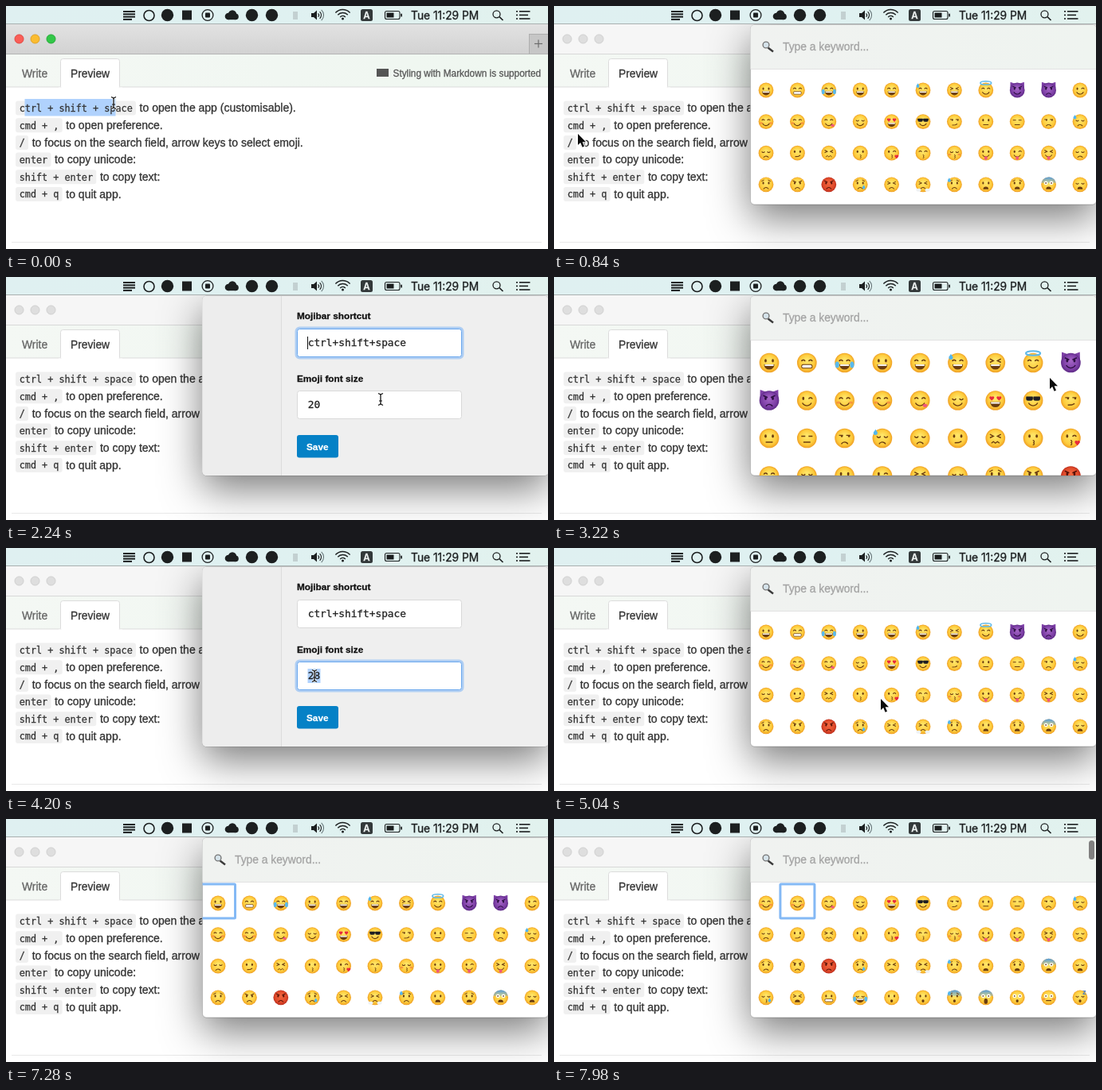
Animation, 680 px wide and 306 px high, one loop 8000 ms. Source, as an HTML page with a canvas:

```html
<!DOCTYPE html>
<html lang="en">
<head>
<meta charset="utf-8">
<title>Emoji menu bar demo</title>
<style>
html, body { margin: 0; width: 680px; height: 306px; overflow: hidden; background: #fff; }
canvas { display: block; width: 680px; height: 306px; }
</style>
</head>
<body>
<canvas id="stage"></canvas>
<script>
const W = 680, H = 306, LOOP = 8000, STEP = 140, TAU = Math.PI * 2;
const canvas = document.getElementById('stage');
const dpr = window.devicePixelRatio || 1;
canvas.width = W * dpr;
canvas.height = H * dpr;
const c = canvas.getContext('2d');

const SANS = '"Liberation Sans", Arial, sans-serif';
const MONO = '"DejaVu Sans Mono", monospace';
const UI = 'Inter, Roboto, sans-serif';

// ---- helpers ----
function rect(x, y, w, h, fill) {
  c.fillStyle = fill;
  c.fillRect(x, y, w, h);
}
function round(x, y, w, h, r, fill, stroke, lw = 1) {
  c.beginPath();
  c.roundRect(x, y, w, h, r);
  if (fill) { c.fillStyle = fill; c.fill(); }
  if (stroke) { c.strokeStyle = stroke; c.lineWidth = lw; c.stroke(); }
}
function disc(x, y, r, fill, stroke, lw = 1) {
  c.beginPath();
  c.arc(x, y, r, 0, TAU);
  if (fill) { c.fillStyle = fill; c.fill(); }
  if (stroke) { c.strokeStyle = stroke; c.lineWidth = lw; c.stroke(); }
}
function oval(x, y, rx, ry, fill) {
  c.beginPath();
  c.ellipse(x, y, rx, ry, 0, 0, TAU);
  c.fillStyle = fill;
  c.fill();
}
function path(points, fill, stroke, lw = 1) {
  c.beginPath();
  points.forEach(p => c.lineTo(p[0], p[1]));
  if (fill) { c.closePath(); c.fillStyle = fill; c.fill(); }
  if (stroke) { c.strokeStyle = stroke; c.lineWidth = lw; c.stroke(); }
}
function bow(x, y, r, from, to, color, lw) {
  c.beginPath();
  c.arc(x, y, r, from * Math.PI, to * Math.PI);
  c.strokeStyle = color;
  c.lineWidth = lw;
  c.stroke();
}
// A hairline outline gives the slightly heavy look of smoothed desktop type.
function text(s, x, y, size, color, font = SANS, weight = '') {
  c.font = `${weight} ${size}px ${font}`;
  c.fillStyle = c.strokeStyle = color;
  c.lineWidth = size * .022;
  c.fillText(s, x, y);
  c.strokeText(s, x, y);
}
function fade(x0, y0, x1, y1, ...colors) {
  const g = c.createLinearGradient(x0, y0, x1, y1);
  colors.forEach((k, i) => g.addColorStop(i / (colors.length - 1), k));
  return g;
}

// ---- menu bar ----
function menuBar() {
  const ink = '#1c1f20';
  rect(0, 0, W, 22, fade(0, 0, W, 0, '#dff0f1', '#dff1f1', '#e2f2ee'));
  rect(0, 22, W, 1, '#a9b0b0');
  for (let i = 0; i < 4; i++) rect(147, 6 + i * 3.3, i === 3 ? 11 : 15, 2, ink);
  disc(179.5, 12, 6.5, null, ink, 1.6);
  disc(202.5, 11.5, 7.7, ink);
  rect(221, 5.5, 12, 12, ink);
  disc(253, 11.5, 6.9, null, ink, 1.3);
  round(250, 8.5, 6, 6, 1, ink);
  disc(279, 13, 4.3, ink);
  disc(284, 10.5, 5.2, ink);
  disc(288, 13.4, 3.8, ink);
  rect(279, 12, 9, 5.2, ink);
  disc(308.5, 11.5, 7.7, ink);
  disc(333.5, 11.5, 7.7, ink);
  rect(360, 7, 6, 10, '#c3d0d1');
  path([[383, 9], [386, 9], [390, 5.5], [390, 17.5], [386, 14], [383, 14]], ink);
  [3, 6, 9].forEach((r, i) => bow(389.5, 11.5, r, -.26, .26, i < 2 ? ink : '#68777a', 1.1));
  [4.5, 8.5, 12.5].forEach(r => bow(422.5, 17, r, -.76, -.24, ink, 1.4));
  disc(422.5, 16, 1.5, ink);
  round(445, 4, 15, 15, 2.5, '#33393a');
  text('A', 448.3, 15.6, 11.5, '#f1f6f5', UI, 600);
  round(475.5, 6.5, 18.5, 10, 2, null, ink, 1.1);
  rect(477.5, 8.5, 9, 6, ink);
  round(495.3, 9.5, 1.7, 4, 1, ink);
  text('Tue 11:29 PM', 508, 16.6, 13.8, ink, UI);
  disc(615.5, 10.3, 4.5, null, ink, 1.3);
  path([[619, 13.7], [623.5, 18]], null, ink, 1.6);
  for (let i = 0; i < 3; i++) {
    rect(640, 6 + i * 4.6, 2, 1.6, ink);
    rect(644, 6 + i * 4.6, i === 1 ? 11 : 13.5, 1.6, ink);
  }
}

// ---- browser window ----
const LINES = [
  ['ctrl + shift + space', 'to open the app (customisable).'],
  ['cmd + ,', 'to open preference.'],
  ['/', 'to focus on the search field, arrow keys to select emoji.'],
  ['enter', 'to copy unicode:'],
  ['shift + enter', 'to copy text:'],
  ['cmd + q', 'to quit app.']
];

function browser(active, selEnd) {
  rect(0, 22, W, H - 22, '#fff');
  rect(0, 23, W, 37, active ? fade(0, 23, 0, 60, '#e2e2e2', '#d2d2d2') : '#f6f6f6');
  rect(0, 60, W, 1, active ? '#b4b4b4' : '#d8d8d8');
  const lights = active
    ? [['#fa5e57', '#e1443e'], ['#fbbc30', '#dfa023'], ['#32c748', '#24aa35']]
    : Array(3).fill(['#dedede', '#cfcfcf']);
  lights.forEach(([f, s], i) => disc(16.5 + i * 20, 41.5, 5.5, f, s));
  if (active) {
    rect(656, 35, 24, 25, '#c6c6c6');
    rect(656, 35, 24, 1, '#aeaeae');
    rect(656, 35, 1, 25, '#aeaeae');
    path([[663, 47.5], [673, 47.5]], null, '#6c6c6c', 1.2);
    path([[668, 42.5], [668, 52.5]], null, '#6c6c6c', 1.2);
  }
  rect(0, 61, W, 41, fade(0, 0, W, 0, '#f4f8f4', '#f1f7f2', '#eff7f0'));
  rect(0, 101.5, W, 1, '#dcdcdc');
  round(68.5, 66.5, 74, 38, 3, '#fff', '#dcdcdc');
  rect(66, 102.5, 80, 4, '#fff');
  text('Write', 20, 89.6, 13.9, '#666');
  text('Preview', 81, 89.6, 13.8, '#333');
  rect(465, 79, 15, 10, '#555');
  text('Styling with Markdown is supported', 485.5, 88.7, 11.85, '#555');

  LINES.forEach(([code, note], i) => {
    const y = 128.5 + i * 21.7, w = code.length * 7.1 + 9;
    round(12, y - 9, w, 18, 3, '#f0f0f0');
    if (!i && selEnd) rect(23.5, 117, selEnd - 23.5, 21.5, '#b0d2fd');
    text(code, 16.7, y + 4.3, 11.8, '#333', MONO);
    text(note, 16.6 + w, y + 4.8, 14, '#333');
  });
  rect(7, 297, 665, 1, '#e9e9e9');
}

// ---- emoji: eyes, mouth, extras ----
const FACES = ('oG uB uGT oG uG uGd xG uSH aSp afp wS ' +
  'uSc uSc uSy nS hG gS l/ o- -- lf nfd ' +
  'nf o/ xw ok wkh uk nkc ot wt xt nf ' +
  'sf af afr sfe xf xfm sfd oD sD ODb nD ' +
  'nke xD oB nGT oo oo sobd OOb Oo O-c noZ').split(' ');

function eyes(kind, ink) {
  for (const s of [-1, 1]) {
    const x = s * .36, y = -.2;
    const k = kind === 'w' ? (s < 0 ? 'o' : 'u') : kind;
    if ('oas'.includes(k)) oval(x, y, .11, .17, ink);
    if (k === 'a') path([[s * .6, -.5], [s * .16, -.3]], null, ink, .12);
    if (k === 's') path([[s * .6, -.42], [s * .26, -.6]], null, ink, .1);
    if (k === 'u') bow(x, -.1, .18, 1.08, 1.92, ink, .12);
    if (k === 'n') bow(x, -.26, .19, .1, .9, ink, .11);
    if (k === '-') path([[x - .2, y], [x + .2, y]], null, ink, .11);
    if (k === 'x') path([[s * .55, -.38], [s * .2, -.2], [s * .55, -.04]], null, ink, .11);
    if (k === 'l') {
      path([[x - .2, -.28], [x + .2, -.28]], null, ink, .1);
      oval(x + .08, -.2, .1, .1, ink);
    }
    if (k === 'O') {
      oval(x, y, .24, .25, '#fff');
      oval(x, y, .09, .1, ink);
    }
    if (k === 'h') heart(x, -.26, .34);
    if (k === 'g') {
      c.beginPath();
      c.roundRect(x - .34, -.4, .68, .42, [.05, .05, .2, .2]);
      c.fillStyle = '#1d1d22';
      c.fill();
    }
  }
}

function mouth(kind, ink) {
  if (kind === 'G') {
    c.beginPath();
    c.arc(0, .16, .52, 0, Math.PI);
    c.closePath();
    c.fillStyle = ink;
    c.fill();
    rect(-.44, .17, .88, .15, '#fff');
  }
  if (kind === 'B') round(-.52, .18, 1.04, .36, .16, '#fff', ink, .08);
  if (kind === 'S') bow(0, .02, .5, .14, .86, ink, .11);
  if (kind === 'f') bow(0, .78, .38, 1.17, 1.83, ink, .11);
  if (kind === '-') path([[-.35, .4], [.35, .4]], null, ink, .11);
  if (kind === '/') path([[-.3, .46], [.1, .44], [.38, .3]], null, ink, .11);
  if (kind === 'w') path([[-.4, .5], [-.2, .34], [0, .5], [.2, .34], [.4, .5]], null, ink, .1);
  if (kind === 'k') {
    bow(0, .34, .11, -.6, .5, ink, .09);
    bow(0, .55, .11, -.5, .6, ink, .09);
  }
  if (kind === 'o') oval(0, .45, .17, .2, ink);
  if (kind === 'O') oval(0, .48, .24, .36, ink);
  if (kind === 'D') {
    c.beginPath();
    c.arc(0, .62, .34, Math.PI, TAU);
    c.closePath();
    c.fillStyle = ink;
    c.fill();
  }
  if (kind === 't' || kind === 'y') {
    bow(0, .02, .48, .14, .86, ink, .11);
    round(-.2, .46, .4, .42, [0, 0, .2, .2], '#f0597a');
  }
}

function heart(x, y, s) {
  const red = '#e8283c';
  disc(x - s * .32, y - s * .1, s * .38, red);
  disc(x + s * .32, y - s * .1, s * .38, red);
  path([[x - s * .68, y + s * .05], [x + s * .68, y + s * .05], [x, y + s * .85]], red);
}
function drop(x, y, s) {
  disc(x, y, s, '#52b6ee');
  path([[x - s * .9, y - s * .3], [x, y - s * 1.9], [x + s * .9, y - s * .3]], '#52b6ee');
}

function extra(kind) {
  if (kind === 'T') for (const s of [-1, 1]) oval(s * .74, .2, .2, .32, '#58b9ef');
  if (kind === 'd') drop(-.68, -.52, .2);
  if (kind === 'e') drop(.46, .42, .19);
  if (kind === 'c') for (const s of [-1, 1]) oval(s * .62, .2, .2, .13, 'rgba(244,98,60,.5)');
  if (kind === 'y') oval(.5, .5, .22, .17, '#f2577c');
  if (kind === 'h') heart(.65, .42, .36);
  if (kind === 'm') for (const s of [-1, 1]) oval(s * .58, .72, .32, .2, '#eef2f6');
  if (kind === 'Z') text('z', .35, -.4, .9, '#4b7fc0', SANS, 'bold');
  if (kind === 'H') {
    c.beginPath();
    c.ellipse(0, -.95, .72, .22, 0, 0, TAU);
    c.strokeStyle = '#5fb9ea';
    c.lineWidth = .17;
    c.stroke();
  }
}

function emoji(spec, x, y, r) {
  const [eye, lip, ...more] = spec;
  const purple = more.includes('p'), red = more.includes('r');
  const tones = purple ? ['#a263c4', '#7d3fa6', '#5d2a85']
    : red ? ['#f0653e', '#e04a2a', '#b92c1c']
    : ['#ffe568', '#fdcb3c', '#ee9c22'];
  c.save();
  c.translate(x, y);
  c.scale(r, r);
  if (purple) for (const s of [-1, 1]) path([[s * .9, -1.08], [s * .92, -.2], [s * .3, -.85]], tones[1]);
  const g = c.createRadialGradient(0, -.25, .1, 0, 0, 1);
  g.addColorStop(0, tones[0]);
  g.addColorStop(.7, tones[1]);
  g.addColorStop(1, tones[2]);
  disc(0, 0, .98, g);
  if (more.includes('b')) {
    c.beginPath();
    c.arc(0, 0, .98, 1.06 * Math.PI, 1.94 * Math.PI);
    c.fillStyle = fade(0, -1, 0, -.15, '#4f9be0', 'rgba(120,180,225,.35)');
    c.fill();
  }
  const ink = purple ? '#2c0f42' : red ? '#561208' : '#6a3c10';
  eyes(eye, ink);
  mouth(lip, ink);
  more.forEach(extra);
  c.restore();
}

// ---- popover ----
function popover(draw) {
  c.save();
  c.beginPath();
  c.rect(0, 23, W, H - 23);
  c.clip();
  c.save();
  c.shadowColor = 'rgba(0,0,0,.52)';
  c.shadowBlur = 50 * dpr;
  c.shadowOffsetY = 17 * dpr;
  round(246.5, 24, 434, 226, 5, '#fff');
  c.restore();
  round(246.5, 24, 434, 226, 5, '#fff', 'rgba(0,0,0,.22)');
  c.beginPath();
  c.roundRect(246.5, 24, 434, 226, 5);
  c.clip();
  draw();
  c.restore();
}

function grid(big, focus, row) {
  rect(246, 24, 434, 55, fade(246, 0, W, 0, '#f0f2f0', '#eff4f0'));
  rect(246, 79, 434, 1, '#e2e2e2');
  path([[268.5, 52.5], [275, 57.5]], null, '#3b3b3b', 2.4);
  disc(266, 49, 3.9, '#d5e3ea', '#777', 1.4);
  text('Type a keyword...', 287, 56, 13.8, '#a3a3a3');

  const cols = big ? 9 : 11, gap = big ? 47.3 : 39.4, r = big ? 12.6 : 9.6;
  const x0 = big ? 270 : 266, y0 = big ? 108 : 106;
  c.save();
  c.beginPath();
  c.rect(246, 80, 434, 170);
  c.clip();
  FACES.forEach((f, i) => {
    const x = x0 + (i % cols) * gap;
    const y = y0 + (Math.floor(i / cols) - row) * (gap + .2);
    if (y < 80 || y > 270) return;
    emoji(f, x, y, r);
    if (i === focus) round(x - 21.5, y - 24, 43, 43, 1, null, '#84b9f5', 3);
  });
  c.restore();
  if (row) round(671, 27, 7, 24, 3.5, '#808080');
}

function field(y, value, focused, selected, caret) {
  if (focused) round(364.5, y - .5, 208, 37, 4, null, 'rgba(96,165,245,.45)', 4);
  round(365.5, y + .5, 206, 35, 3, '#fff', focused ? '#6ba8ee' : '#d9d9d9');
  if (selected) rect(378.5, y + 9, 16, 18, '#b0d2fd');
  text(value, 378.7, y + 22.3, 12.8, '#222', MONO);
  if (caret !== null) rect(caret, y + 10, 1, 16, '#111');
}

function prefs(size, editing, selected) {
  rect(246, 24, 434, 226, '#efefef');
  rect(246, 24, 99, 226, '#ededed');
  rect(345, 24, 1, 226, '#dcdcdc');
  text('Mojibar shortcut', 365, 53.3, 11.8, '#111', SANS, 'bold');
  field(65, 'ctrl+shift+space', !editing, false, editing ? null : 378);
  text('Emoji font size', 365, 131.6, 11.8, '#111', SANS, 'bold');
  field(143, size, editing, selected, editing && !selected ? 379 + size.length * 7.7 : null);
  round(365, 199, 52, 28.5, 3, '#0581c6');
  text('Save', 377, 217.6, 11.8, '#fff', SANS, 'bold');
}

// ---- pointer: step, x, y ----
const TRACK = [
  [0, 135, 122], [1, 158, 124], [5, 30, 161], [10, 30, 161],
  [13, 470, 154], [16, 470, 154], [17, 387, 161], [19, 387, 161],
  [21, 392, 208], [23, 622, 127], [27, 622, 127], [30, 387, 161],
  [32, 387, 161], [33, 392, 208], [36, 410, 190], [40, 410, 190],
  [44, 130, 176], [46, 97, 178.5], [48, 30, 172], [58, 30, 172]
];

function pointerAt(k) {
  const i = TRACK.findIndex(p => p[0] > k);
  const [k0, x0, y0] = TRACK[i - 1], [k1, x1, y1] = TRACK[i];
  const u = (k - k0) / (k1 - k0);
  return [x0 + (x1 - x0) * u, y0 + (y1 - y0) * u];
}

function pointer(x, y, beam) {
  c.save();
  c.translate(x, y);
  c.lineJoin = 'round';
  if (beam) {
    for (const [col, lw] of [['rgba(255,255,255,.8)', 3], ['#111', 1.3]]) {
      path([[0, -6], [0, 6]], null, col, lw);
      path([[-3, -7.5], [0, -6], [3, -7.5]], null, col, lw);
      path([[-3, 7.5], [0, 6], [3, 7.5]], null, col, lw);
    }
    path([[-2, 2], [2, 2]], null, '#111', 1);
  } else {
    const tip = [[0, 0], [0, 14], [3.2, 11], [5.6, 16.8], [8, 15.8], [5.6, 10.2], [10, 10.2], [0, 0]];
    path(tip, null, '#fff', 2.2);
    path(tip, '#0b0b0b');
  }
  c.restore();
}

// ---- timeline ----
const within = (k, a, b) => k >= a && k < b;

function frame(now) {
  const k = Math.floor((now % LOOP) / STEP);
  const open = within(k, 4, 41) || k >= 49;
  const setup = within(k, 11, 22) || within(k, 28, 34);
  const big = within(k, 22, 28);
  const [x, y] = pointerAt(k);

  c.setTransform(dpr, 0, 0, dpr, 0, 0);
  browser(!open, k < 1 ? 137.5 : k < 3 ? 159 : 0);
  menuBar();
  if (open) popover(() => {
    if (setup) {
      const size = k === 18 || k === 31 ? '2' : within(k, 19, 31) ? '28' : '20';
      prefs(size, within(k, 17, 22) || k >= 30, k === 17 || k === 30);
    } else {
      const focus = k >= 55 ? 12 : k >= 53 ? 1 : k >= 52 ? 0 : -1;
      grid(big, focus, k >= 55 ? 1 : 0);
    }
  });
  const onField = within(x, 365, 572) && (within(y, 65, 101) || within(y, 143, 179));
  if (k < 51) pointer(x, y, open ? setup && onField : true);
  requestAnimationFrame(frame);
}
requestAnimationFrame(frame);
</script>
</body>
</html>
```
